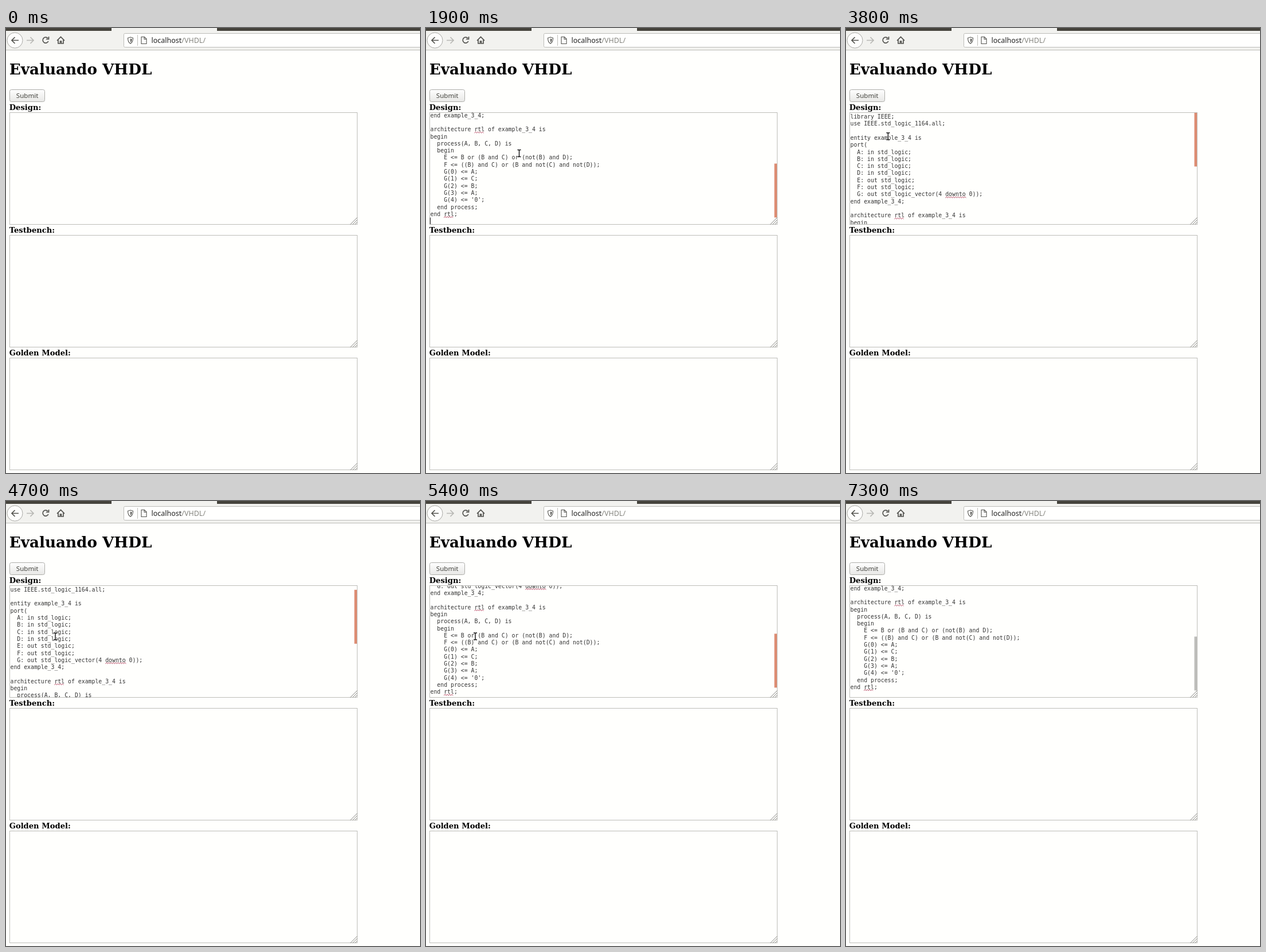
An HTML page for the animation above (8000 ms loop, 722 by 776 pixels).

```html
<!DOCTYPE html>
<html lang="es">
<head>
<meta charset="utf-8">
<title>Evaluando VHDL</title>
<style>
  html, body { margin: 0; width: 100%; height: 100%; overflow: hidden; background: #fffffd; }
  svg { display: block; }
  text { white-space: pre; }
  .serif { font: bold 13.12px "DejaVu Serif", serif; }
  .title { font-size: 26.24px; }
  .ui { font: 12.5px "Noto Sans", sans-serif; }
  .button { font-size: 11.6px; fill: #44443f; text-anchor: middle; }
  .code { font: 9.84px "DejaVu Sans Mono", monospace; fill: #333; }
  .icon { fill: none; stroke: #53534f; stroke-width: 1.7; }
  .thin { stroke-width: 1.1; }
  .pale { stroke: #b8b8b4; }
  .edge { fill: none; stroke: #bdbdb9; }
  .grip { fill: none; stroke: #858581; }
  .typo { fill: none; stroke: #a82444; stroke-width: 0.9; }
</style>
</head>
<body>
<svg width="722" height="776" viewBox="0 0 722 776">
  <defs>
    <linearGradient id="face" x2="0" y2="1">
      <stop stop-color="#fefefe"/><stop offset="1" stop-color="#e8e8e6"/>
    </linearGradient>
    <clipPath id="inside"><path d="M6.5 148H612.5V342.5H6.5Z"/></clipPath>
    <path id="ibeam" d="M-3-6H-1L0-5 1-6H3M-3 6H-1L0 5 1 6H3M0-5V5"/>
  </defs>

  <path d="M0 0H722V38H0Z" fill="#f2f2ef"/>
  <path d="M0 0H184V5H0ZM368 0H722V5H368Z" fill="#45433c"/>
  <path class="edge" d="M0 38.5H722"/>
  <circle cx="15.5" cy="21.5" r="13.5" fill="#fdfdfc" stroke="#a9a9a5"/>
  <path class="icon" d="M22 21.5H10M15.5 16l-5.5 5.5 5.5 5.5"/>
  <path class="icon pale" d="M36 21.5H48M42.5 16l5.5 5.5-5.5 5.5"/>
  <path class="icon" d="M73 18a5 5 0 1 0 .8 5M74.5 15v4.5h-4.5"/>
  <path class="icon" d="M89 22l6.5-6.5 6.5 6.5M91 20.500v6.500h3.500v-4h2v4h3.500v-6.500"/>
  <rect x="205.5" y="9.5" width="530" height="24" rx="2" fill="#fffffe" stroke="#bdbdb9"/>
  <path class="icon thin" d="M217 16l4.500 1.300c0 5-1 8-4.500 10-3.500-2-4.500-5-4.500-10Z"/>
  <path d="M217 18.500l2.500 .7c0 3-.7 4.500-2.500 6Z" fill="#53534f"/>
  <path class="edge" d="M229.5 12V31"/>
  <path class="icon thin" d="M236 15.500h5.500l3.500 3.500v8.500h-9ZM241 15.500v4h4"/>
  <text class="ui" x="253.5" y="26" fill="#222">localhost<tspan fill="#85857f">/VHDL/</tspan></text>

  <text class="serif title" x="5.7" y="81">Evaluando VHDL</text>
  <rect x="6.5" y="107.5" width="61" height="21" rx="3" fill="url(#face)" stroke="#adada9"/>
  <text class="ui button" x="37.2" y="122.3">Submit</text>

  <g clip-path="url(#inside)">
    <g id="scroller">
      <g id="listing"></g>
      <path id="caret" d="M7.5-9.5v12.5" stroke="#222"/>
    </g>
    <rect id="thumb" x="607.5" width="5" height="94"/>
  </g>
  <g id="fields"></g>

  <g id="pointer">
    <g id="beam" fill="none">
      <use href="#ibeam" stroke="#fff" stroke-width="3"/>
      <use href="#ibeam" stroke="#111" stroke-width="1.4"/>
    </g>
    <path id="arrow" d="M-3-6.500V4L-.8 2 1 6.500 2.500 5.800 .8 1.500H3.500Z" fill="#111" stroke="#fff" stroke-width=".7"/>
  </g>
</svg>
<script>
const LOOP = 8000, STEP = 100;
const LEFT = 7.5, BASE = 158, PITCH = 12.3, CHAR = 5.924;
const TOP = 147.5, FIELD_GAP = 214.2, MAX_SCROLL = 150;

const source = `library IEEE;
use IEEE.std_logic_1164.all;

entity example_3_4 is
port(
${[...'ABCDEF'].map(pin => `  ${pin}: ${pin < 'E' ? 'in' : 'out'} std_logic;`).join('\n')}
  G: out std_logic_vector(4 downto 0));
end example_3_4;

architecture rtl of example_3_4 is
begin
  process(A, B, C, D) is
  begin
    E <= B or (B and C) or (not(B) and D);
    F <= ((B) and C) or (B and not(C) and not(D));
${['A', 'C', 'B', 'A', "'0'"].map((value, i) => `    G(${i}) <= ${value};`).join('\n')}
  end process;
end rtl;
`.split('\n');

// Each stroke of the hand ends at (x, y); sway adds one swing to the sides.
const strokes = [
  { from: 500, to: 700, x: 123, y: 209 },
  { from: 1800, to: 1900, x: 162.5, y: 218.5 },
  { from: 1900, to: 2300, x: 92, y: 201, sway: 86 },
  { from: 3100, to: 3200, x: 70, y: 182 },
  { from: 3300, to: 3500, x: 34, y: 166 },
  { from: 3500, to: 4100, x: 79, y: 192 },
  { from: 4200, to: 4400, x: 86, y: 236 },
  { from: 5500, to: 6000, x: 178, y: 308.5 },
  { from: 6100, to: 6300, x: 695.5, y: 443 }
];

const $ = id => document.getElementById(id);
const add = (parent, name, attrs, text = '') => {
  const node = document.createElementNS('http://www.w3.org/2000/svg', name);
  for (const key in attrs) node.setAttribute(key, attrs[key]);
  node.textContent = text;
  $(parent).append(node);
};
const show = (id, on) => $(id).setAttribute('visibility', on ? 'visible' : 'hidden');
const place = (id, x, y) => $(id).setAttribute('transform', `translate(${x} ${y})`);
const between = (t, from, to) => t >= from && t < to;
const progress = (t, from, to) => Math.min(1, Math.max(0, (t - from) / (to - from)));
const easeOut = k => 1 - (1 - k) ** 3;

// Halfway between linear and smoothstep
function glide(t, from, to) {
  const k = progress(t, from, to);
  return (k + k * k * (3 - 2 * k)) / 2;
}

function scrollAt(t) {
  return MAX_SCROLL * (glide(t, 1000, 1400) - glide(t, 2460, 3000) + glide(t, 4590, 5480));
}

function pointerAt(t) {
  let x = 408, y = 408;
  for (const stroke of strokes) {
    const k = progress(t, stroke.from, stroke.to);
    x += (stroke.x - x) * easeOut(k) + (stroke.sway || 0) * Math.sin(2 * Math.PI * k);
    y += (stroke.y - y) * easeOut(k);
  }
  return [x, y];
}

['Design:', 'Testbench:', 'Golden Model:'].forEach((label, i) => {
  const y = TOP + i * FIELD_GAP;
  add('fields', 'text', { class: 'serif', x: 5.7, y: y - 4.5 }, label);
  add('fields', 'rect', { class: 'edge', x: 6.5, y: Math.floor(y) + 0.5, width: 606, height: 195 });
  for (const size of [4, 8, 12])
    add('fields', 'path', { class: 'grip', d: `M${612.5 - size} ${y + 195}l${size}-${size}` });
});

source.forEach((line, row) => {
  const y = BASE + row * PITCH;
  add('listing', 'text', { class: 'code', x: LEFT, y }, line);
  for (const match of line.matchAll(/\b(rtl|downto)\b/g)) {
    const waves = Math.round(match[0].length * CHAR / 4);
    const d = `M${LEFT + match.index * CHAR} ${y + 2.8}` + 'l2-1.8 2 1.8'.repeat(waves);
    add('listing', 'path', { class: 'typo', d });
  }
});

function draw() {
  const t = Math.floor(performance.now() % LOOP / STEP) * STEP;
  const scroll = scrollAt(t);
  const pasted = t >= 1100;

  place('scroller', 0, -scroll);
  show('listing', pasted);
  place('caret', 0, BASE + (pasted ? source.length - 1 : 0) * PITCH);
  show('caret', between(t, 900, 2200) || between(t, 5600, 6900));

  show('thumb', pasted);
  $('thumb').setAttribute('y', TOP + scroll * 0.593);
  $('thumb').setAttribute('fill', t < 7300 ? '#dd8c72' : '#bdbdba');

  const pointing = between(t, 500, 900) || between(t, 1900, 6500);
  place('pointer', ...pointerAt(t));
  show('beam', pointing && t < 6200);
  show('arrow', pointing && t >= 6200);
  requestAnimationFrame(draw);
}
draw();
</script>
</body>
</html>
```
